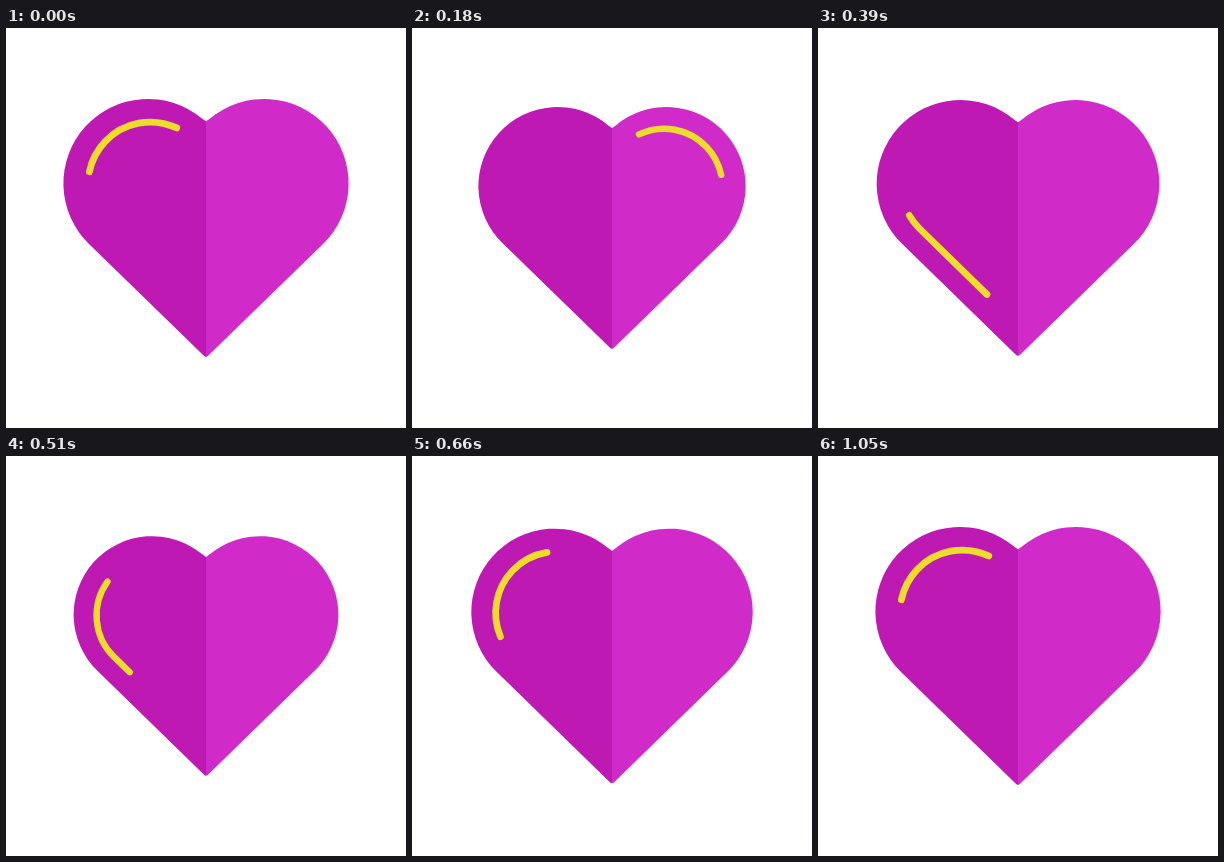
An HTML page for the animation above (1.26 s loop, 400 px wide and 400 px high).

```html
<!DOCTYPE html>
<html lang="en">
<head>
<meta charset="utf-8">
<title>Beating heart</title>
<style>
  html, body { margin: 0; width: 100%; height: 100%; overflow: hidden; background: #fff; }
  svg { display: block; width: 100%; height: 100%; }
</style>
</head>
<body>
<svg viewBox="0 0 400 400">
  <defs>
    <path id="half" d="M200 93.3L196 90.5A84.5 84.5 0 0 0 83 216L197.6 327.6Q198.9 328.9 200 328.9Z"/>
  </defs>
  <g id="heart">
    <use href="#half" fill="#be1ab3"/>
    <use href="#half" fill="#d02bc8" transform="matrix(-1 0 0 1 400 0)"/>
    <path id="shine" pathLength="703" fill="none" stroke="#eddc29" stroke-width="6.8"
      stroke-linecap="round" stroke-linejoin="round" stroke-dasharray="112.5 590.5"
      d="M200 122.8L214.2 109.9A62.24 62.24 0 0 1 299.6 200.4L200 297.6L100.4 200.4A62.24 62.24 0 0 1 185.8 109.9Z"/>
  </g>
</svg>
<script>
  const LOOP = 1260, STEP = 30, RUN = 1050;
  const LENGTH = 703, REST = -150, DEPTH = .085;
  const BEATS = [0, 270, 420, 540, 700]; // the heart is full and squeezed in turn
  const heart = document.getElementById('heart');
  const shine = document.getElementById('shine');

  const smooth = u => u * u * (3 - 2 * u);
  const bezier = (u, a, b) => 3 * u * (1 - u) * ((1 - u) * a + u * b) + u ** 3;

  // Quick start with a long glide, as cubic-bezier(.34, .16, 0, 1)
  function glide(x) {
    let low = 0, high = 1;
    for (let i = 0; i < 24; i++) {
      const mid = (low + high) / 2;
      if (bezier(mid, .34, 0) < x) low = mid; else high = mid;
    }
    return bezier(high, .16, 1);
  }

  function squeeze(t) {
    const next = BEATS.findIndex(beat => beat > t);
    if (next < 0) return 0;
    const from = BEATS[next - 1];
    const p = smooth((t - from) / (BEATS[next] - from));
    return next % 2 ? p : 1 - p;
  }

  function draw(now) {
    const t = Math.floor(now % LOOP / STEP) * STEP;
    const scale = 1 - DEPTH * squeeze(t);
    const offset = REST + LENGTH * glide(Math.min(t / RUN, 1));
    heart.setAttribute('transform', `translate(200 200) scale(${scale}) translate(-200 -200)`);
    shine.setAttribute('stroke-dashoffset', -offset);
  }

  let start;
  function tick(now) {
    start ??= now;
    draw(now - start);
    requestAnimationFrame(tick);
  }
  draw(0);
  requestAnimationFrame(tick);
</script>
</body>
</html>
```
